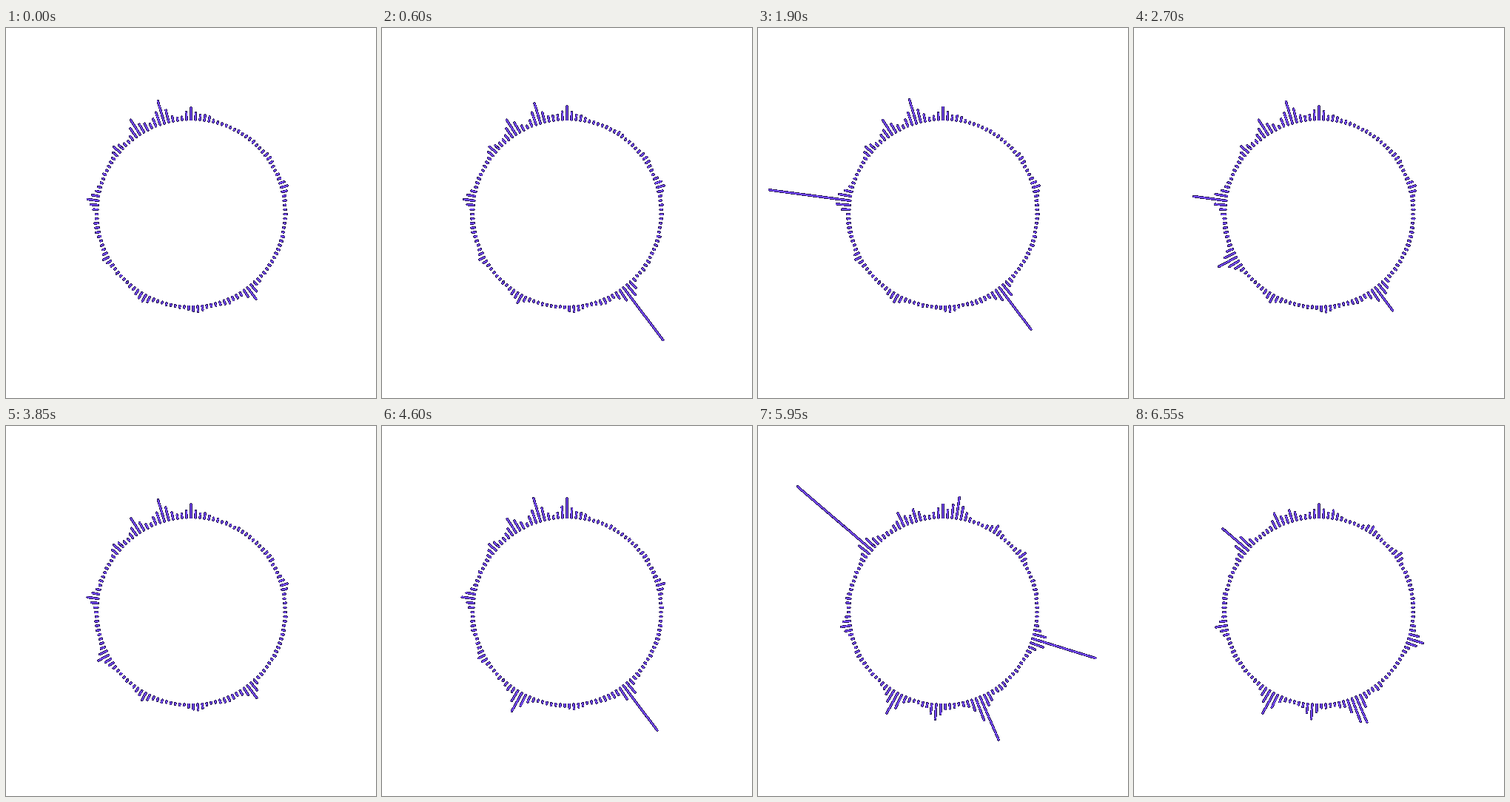
Animation of 500 by 500 pixels, one loop 6.6 s. Source, as an HTML page:

```html
<!DOCTYPE html>
<html lang="en">
<head>
<meta charset="utf-8">
<title>Radial spectrum</title>
<style>
html, body { margin: 0; width: 100%; height: 100%; overflow: hidden; background: #fff; }
svg { display: block; width: 500px; height: 500px; }
path { fill: none; stroke-linecap: round; shape-rendering: crispEdges; }
.edge { stroke: #21134f; stroke-width: 3.6; }
.core { stroke: #7449f5; stroke-width: 2; }
</style>
</head>
<body>
<svg viewBox="0 0 500 500"><path class="edge"/><path class="core"/></svg>
<script>
const LOOP = 6600, STEP = 50, BARS = 131, RADIUS = 125, REST = 4;
const CHANGE = 4900, FADE = 200, ATTACK = 100;
const paths = document.querySelectorAll('path');

// Sounding bars, clockwise from the top: bar, loudness in the first and second chord.
const tones = [
  [0, 20, 21], [3, 9, 12], [12, 4, 12], [20, 7, 12], [27, 12, 5],
  [39, 5, 22], [52, 22, 9], [57, 8, 36], [58, 6, 36], [64, 10, 8],
  [-64, 4, 22], [-55, 13, 32], [-54, 10, 20], [-43, 10, 6], [-36, 6, 16],
  [-30, 18, 7], [-18, 14, 40], [-12, 25, 6], [-9, 5, 20], [-6, 34, 18]
];

// Struck notes that ring off: bar, time, peak, fall time in ms.
const hits = [
  [52, 350, 105, 1900], [3, 1100, 25, 700], [-30, 1750, 125, 1520],
  [52, 1850, 75, 1880], [-43, 2650, 30, 3000], [52, 4350, 101, 1100],
  [0, 4550, 29, 1500], [-55, 4550, 31, 3000], [-18, 5100, 104, 650],
  [39, 5150, 125, 400], [57, 5200, 103, 1150], [3, 5350, 49, 1650],
  [39, 5850, 103, 900], [57, 5850, 70, 1600], [-18, 5900, 142, 970]
];

const clamp = v => Math.max(0, Math.min(1, v));
const mix = (a, b, p) => a + (b - a) * p;
const hash = (a, b) => {
  const v = Math.sin(a * 127.1 + b * 311.7) * 43758.5453;
  return v - Math.floor(v);
};
const flicker = (bar, t) => {
  const k = Math.floor(t / 200);
  return mix(hash(bar, k), hash(bar, k + 1), t / 200 - k);
};
const ring = (t, at, peak, fall) =>
  peak * (t < at ? clamp(1 - (at - t) / ATTACK) : clamp(1 - (t - at) / fall));

function lengthsAt(t) {
  const lengths = Array.from({ length: BARS }, (_, i) => REST + 2 * flicker(i, t) ** 2);
  const raise = (bar, len) => {
    const i = (bar + BARS) % BARS;
    lengths[i] = Math.max(lengths[i], len);
  };
  const sound = (bar, len) => {
    raise(bar, len);
    for (let d = 1; d < 5; d++) {
      for (const side of [bar - d, bar + d]) {
        raise(side, Math.min(len, 32) * (0.4 + 0.2 * flicker(side, t)) ** d + 3);
      }
    }
  };
  const chord = clamp((t - CHANGE) / FADE);
  for (const [bar, first, second] of tones) {
    sound(bar, mix(first, second, chord) * (0.9 + 0.2 * flicker(bar, t)));
  }
  for (const [bar, ...note] of hits) sound(bar, ring(t, ...note));
  return lengths;
}

function draw(now) {
  const t = Math.floor((now % LOOP) / STEP) * STEP;
  const d = lengthsAt(t).map((len, i) => {
    const a = i / BARS * 2 * Math.PI;
    const point = r => `${(250 + r * Math.sin(a)).toFixed(2)} ${(250 - r * Math.cos(a)).toFixed(2)}`;
    return `M${point(RADIUS + 1.3)}L${point(RADIUS + len - 1)}`;
  }).join('');
  for (const path of paths) path.setAttribute('d', d);
}

const begin = performance.now();
function tick() {
  draw(performance.now() - begin);
  requestAnimationFrame(tick);
}
tick();
</script>
</body>
</html>
```
